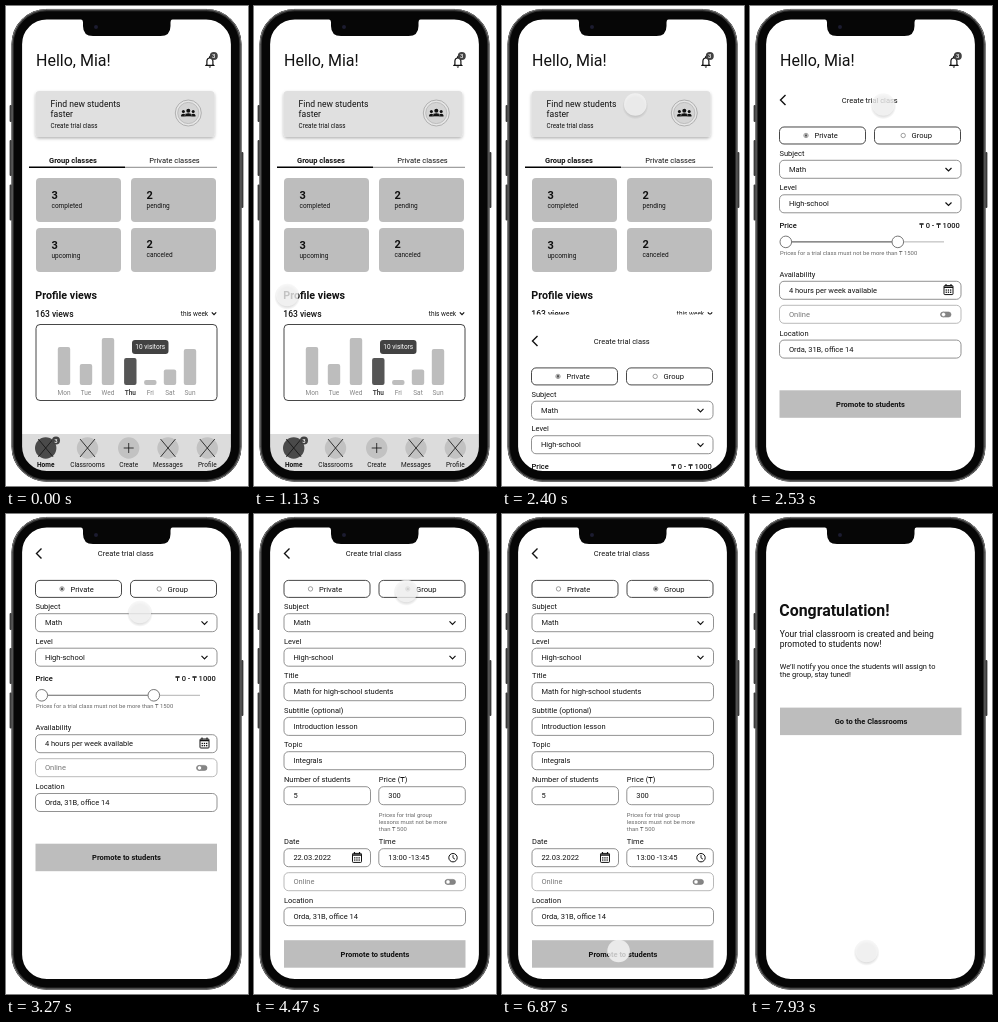
An HTML page for the animation above (8 s loop, 242x480 px).

```html
<!DOCTYPE html>
<html lang="en">
<head>
<meta charset="utf-8">
<title>Trial class prototype</title>
<style>
  html, body { margin: 0; width: 100%; height: 100%; overflow: hidden; background: #fff; }
  svg { display: block; width: 100vw; height: 100vh; }
  text { font-family: Roboto, "Noto Sans", "DejaVu Sans", sans-serif; white-space: pre; }
</style>
</head>
<body>
<svg id="stage" viewBox="0 0 242 480"></svg>
<script>
const LOOP = 8000;
const GRAY = '#bdbdbd', DARK = '#424242', INK = '#111';

// Drawing helpers, each returning SVG markup
const text = (x, y, str, size = 7.5, o = {}) =>
  `<text x="${x}" y="${y}" font-size="${size}" font-weight="${o.w || 400}" fill="${o.fill || INK}" text-anchor="${o.at || 'start'}">${str}</text>`;
const rect = (x, y, w, h, r, fill, stroke = 'none', sw = 0.8) =>
  `<rect x="${x}" y="${y}" width="${w}" height="${h}" rx="${r}" fill="${fill}" stroke="${stroke}" stroke-width="${sw}"/>`;
const disc = (x, y, r, fill, stroke = 'none', sw = 0.8) =>
  `<circle cx="${x}" cy="${y}" r="${r}" fill="${fill}" stroke="${stroke}" stroke-width="${sw}"/>`;
const line = (d, stroke = INK, sw = 0.8) =>
  `<path d="${d}" fill="none" stroke="${stroke}" stroke-width="${sw}"/>`;
const group = (id, body) => `<g id="${id}">${body}</g>`;

const badge = (x, y) => disc(x, y, 4, DARK) + text(x, y + 2.1, '3', 6, { fill: '#fff', at: 'middle', w: 500 });
const chevron = (x, y, s = 3) => line(`M${x - s} ${y - s / 2}l${s} ${s}l${s} ${-s}`, INK, 1.2);

function people(x, y) {
  const side = dx => disc(x + dx, y - 1.4, 1.5, INK) +
    `<path d="M${x + dx - 2.3} ${y + 3.6}v-1.2q0-1.7 2.3-1.7t2.3 1.7v1.2z" fill="${INK}"/>`;
  return side(-4.9) + side(4.9) + disc(x, y - 2.2, 2, INK) +
    `<path d="M${x - 3.4} ${y + 3.6}v-1.3q0-2.2 3.4-2.2t3.4 2.2v1.3z" fill="${INK}" stroke="#d4d4d4" stroke-width=".4"/>`;
}

function calendar(x, y) {
  let s = rect(x - 4.5, y - 4, 9, 9, 0.8, 'none', INK, 1) + line(`M${x - 4.5} ${y - 2.4}h9`, INK, 1.5) +
    line(`M${x - 2.5} ${y - 5.5}v2M${x + 2.5} ${y - 5.5}v2`, INK, 1.1);
  for (let i = 0; i < 6; i++) s += rect(x - 2.9 + (i % 3) * 2.2, y - 0.2 + (i > 2) * 2.2, 1.3, 1.3, 0, INK);
  return s;
}

const clock = (x, y) => disc(x, y, 4.2, 'none', INK, 1) + line(`M${x} ${y - 2.6}v2.8l2 1.3`, INK, 0.9);

function tile(x, y, n, label, dy) {
  return rect(x, y, 85, 44, 4, GRAY) + text(x + 15.5, y + 21 - dy, n, 11, { w: 700 }) +
    text(x + 15.5, y + 30 - dy, label, 6.5);
}

function chart() {
  const days = ['Mon', 'Tue', 'Wed', 'Thu', 'Fri', 'Sat', 'Sun'];
  const mid = [58, 80, 102, 124.3, 144.3, 164, 184], top = [341, 358, 332, 352, 374, 363.5, 343];
  return rect(30, 318.5, 181, 76, 4, '#fff', '#333', 0.9) + days.map((d, i) => {
    const on = d === 'Thu';
    return rect(mid[i] - 6.2, top[i], 12.4, 379 - top[i], 2, on ? '#555' : GRAY) +
      text(mid[i], 389, d, 6.5, { at: 'middle', w: on ? 700 : 400, fill: on ? '#444' : '#858585' });
  }).join('') + rect(126, 334, 36.5, 14, 3, DARK) + text(144.2, 343.4, '10 visitors', 6.5, { at: 'middle', fill: '#fff' });
}

function tabBar() {
  const names = ['Home', 'Classrooms', 'Create', 'Messages', 'Profile'], mid = [39.7, 81.5, 122.7, 162, 201.3];
  return rect(10, 428, 222, 45, 0, '#dcdcdc') + names.map((n, i) => {
    const x = mid[i], home = i === 0;
    const mark = n === 'Create' ? `M${x - 5} 442h10M${x} 437v10` : `M${x - 7.5} 433l15 18m0-18l-15 18`;
    return disc(x, 442, 10.7, home ? '#4a4a4a' : '#c2c2c2') + line(mark, INK, 0.8) +
      text(x, 461, n, 6.5, { at: 'middle', w: home ? 700 : 400 });
  }).join('') + badge(50, 434.5);
}

function homePage() {
  const bell = 'M12 22c1.1 0 2-.9 2-2h-4c0 1.1.9 2 2 2zm6-6v-5c0-3.07-1.63-5.64-4.5-6.32V4c0-.83-.67-1.5-1.5-1.5s-1.5.67-1.5 1.5v.68C7.64 5.36 6 7.92 6 11v5l-2 2v1h16v-1l-2-2zm-2 1H8v-6c0-2.48 1.51-4.5 4-4.5s4 2.02 4 4.5v6z';
  return text(30, 60.3, 'Hello, Mia!', 16) +
    `<path d="${bell}" transform="translate(196.7 48.6) scale(.6)" fill="${INK}"/>` + badge(207.8, 50) +
    `<g filter="url(#soft)">${rect(29.5, 85, 179, 46, 4, '#e0e0e0')}</g>` +
    text(44.6, 101, 'Find new students', 8.6) + text(44.6, 111, 'faster', 8.6) +
    text(44.6, 122, 'Create trial class', 6.3) +
    disc(182.3, 107, 13, '#e6e6e6', '#aaa', 0.9) + disc(182.3, 107, 10.6, '#d4d4d4', '#b4b4b4', 0.8) + people(182.3, 107) +
    text(67, 157, 'Group classes', 7.5, { at: 'middle', w: 700 }) +
    text(168.5, 157, 'Private classes', 7.5, { at: 'middle' }) +
    line('M119 161.3H211', '#555', 0.7) + line('M23 161.3H119', '#000', 1.5) +
    tile(30, 172, '3', 'completed', 0) + tile(125, 172, '2', 'pending', 0) +
    tile(30, 222, '3', 'upcoming', 0) + tile(125, 222, '2', 'canceled', 0.6) +
    text(29.3, 293, 'Profile views', 10.7, { w: 600 }) + text(29.3, 310.5, '163 views', 8.5, { w: 500 }) +
    text(174.8, 310, 'this week', 6.5) + chevron(208, 307.5, 2.2) + chart() + tabBar();
}

// Form parts; x is the left margin
const field = (x, y, str, w = 181.5, muted = false) =>
  rect(x, y - 0.3, w, 18, 4.5, '#fff', muted ? '#a8a8a8' : '#777', 0.8) +
  text(x + 9.4, y + 11.3, str, 7.5, { fill: muted ? '#777' : INK });
const labelled = (x, y, label, str, w) => text(x, y - 4.8, label) + field(x, y, str, w);
const online = (x, y) => field(x, y, 'Online', 181.5, true) +
  rect(x + 161, y + 6.4, 10.5, 5, 2.5, '#858585', '#777', 0.6) + disc(x + 164, y + 8.9, 2.2, '#fff', '#777', 0.7);
const button = (x, y, str) => rect(x, y, 181.5, 27.5, 0, GRAY) +
  text(x + 91, y + 16.4, str, 7.5, { at: 'middle', w: 700 });

function radio(x, y, dot, label, on) {
  return rect(x, y, 86, 17, 4.5, '#fff', '#333', 0.9) + disc(x + dot, y + 8.5, 2.2, '#fff', '#777', 0.7) +
    (on ? disc(x + dot, y + 8.5, 1.3, '#555') : '') + text(x + dot + 8.4, y + 11.3, label, 7.6);
}

function formHead(x, isGroup) {
  return rect(0, 13, 242, 470, 0, '#fff') + line('M35.5 34.5l-5 5l5 5', INK, 1.4) +
    text(119.8, 42.2, 'Create trial class', 7.5, { at: 'middle' }) +
    radio(x, 66.4, 26.5, 'Private', !isGroup) + radio(x + 95, 66.4, 28.7, 'Group', isGroup) +
    labelled(x, 100, 'Subject', 'Math') + chevron(198.5, 108.9) +
    labelled(x, 134.5, 'Level', 'High-school') + chevron(198.5, 143.4);
}

const PLACE = 'Orda, 31B, office 14';

function privateForm() {
  const x = 29.5, knob = cx => disc(cx, 181.3, 5.8, '#fff', '#777', 1);
  return formHead(x, false) + text(x, 167.4, 'Price', 7.5, { w: 500 }) +
    text(209.7, 167.2, '₸ 0 - ₸ 1000', 7.5, { at: 'end', w: 500 }) +
    line('M148 181.3H194', '#aaa', 0.9) + line('M36 181.3H148', '#666', 1.1) + knob(35.8) + knob(147.8) +
    text(x + 0.5, 194, 'Prices for a trial class must not be more than ₸ 1500', 5.9, { fill: '#666' }) +
    labelled(x, 221, 'Availability', '4 hours per week available') + calendar(198.5, 229) +
    online(x, 245) + labelled(x, 279.8, 'Location', PLACE) + button(x, 329.7, 'Promote to students');
}

function groupForm() {
  const x = 30, x2 = 124.8, half = 86.5;
  const note = ['Prices for trial group', 'lessons must not be more', 'than ₸ 500'];
  return formHead(x, true) +
    labelled(x, 169, 'Title', 'Math for high-school students') +
    labelled(x, 203.7, 'Subtitle (optional)', 'Introduction lesson') +
    labelled(x, 238, 'Topic', 'Integrals') +
    labelled(x, 273, 'Number of students', '5', half) + labelled(x2, 273, 'Price (₸)', '300', half) +
    note.map((s, i) => text(x2, 303 + i * 7, s, 5.9, { fill: '#666' })).join('') +
    labelled(x, 335, 'Date', '22.03.2022', half) + calendar(103, 343.4) +
    labelled(x2, 335, 'Time', '13:00 -13:45', half) + clock(199, 343.7) +
    online(x, 359) + labelled(x, 394, 'Location', PLACE) + button(x, 426.2, 'Promote to students');
}

function donePage() {
  return text(29.3, 102, 'Congratulation!', 15.9, { w: 700 }) +
    text(29.8, 123, 'Your trial classroom is created and being', 8.5) +
    text(29.8, 133, 'promoted to students now!', 8.5) +
    text(29.8, 155, 'We’ll notify you once the students will assign to', 7.45) +
    text(29.8, 163, 'the group, stay tuned!', 7.45) + button(30, 193.6, 'Go to the Classrooms');
}

function phone() {
  const key = (x, y, h) => rect(x, y, 2.4, h, 1, '#3a3a3a');
  return key(3.6, 99, 17) + key(3.6, 134, 36) + key(3.6, 178.5, 36) + key(235, 146, 56) +
    rect(10.8, 8.2, 219.4, 462.2, 30, 'none', '#060606', 10.6) +
    rect(7, 4.4, 227, 469.8, 33.8, 'none', '#333', 1.6) +
    rect(6, 3.4, 229, 471.8, 34.8, 'none', '#7c7c7c', 1) +
    `<path d="M72 12.5h97q-4.5 0-4.5 4v3.5q0 10-10 10H87q-10 0-10-10v-3.5q0-4-5-4z" fill="#060606"/>` +
    disc(90, 21, 2, '#1c1c30');
}

const stage = document.getElementById('stage');
stage.innerHTML = `<defs>
    <clipPath id="screen"><rect x="15" y="12" width="211" height="454" rx="25"/></clipPath>
    <filter id="soft" x="-10%" y="-20%" width="120%" height="150%"><feDropShadow dx="0" dy="1.5" stdDeviation="1.8" flood-opacity=".3"/></filter>
    <radialGradient id="shade"><stop offset=".72" stop-opacity=".14"/><stop offset="1" stop-opacity="0"/></radialGradient>
  </defs>
  <rect width="242" height="480" fill="#fff"/>
  <g clip-path="url(#screen)">` +
  group('home', homePage()) + group('private', privateForm()) + group('group', groupForm()) + group('done', donePage()) +
  '</g>' + phone() +
  group('touch', disc(0, 1.8, 13, 'url(#shade)') + disc(0, 0, 11.3, '#f6f6f6'));

const el = id => document.getElementById(id);
const pages = { home: el('home'), private: el('private'), group: el('group'), done: el('done') };
const touch = el('touch'), shade = touch.firstChild;
touch.lastChild.setAttribute('fill-opacity', 0.78);

const SLIDE = 2352, TO_GROUP = 4465, TO_DONE = 7865;

// Touch moves: start, end, from, to, sideways bend of the path
const moves = [
  [490, 670, [-15, 349], [4, 332], 0],
  [890, 1740, [4, 332], [133.3, 98.5], 18],
  [3220, 3740, [133.3, 98.5], [152.3, 77], 4],
  [5035, 5885, [152.3, 77], [137, 320], -27],
  [6230, 6865, [137, 320], [116.6, 437], 0]
];
// While pressed the touch lies flat, without its shadow
const presses = [[1765, SLIDE], [6860, TO_DONE]];

const clamp = v => Math.min(1, Math.max(0, v));
const swing = v => 0.5 - 0.5 * Math.cos(Math.PI * v);

function touchAt(t) {
  const [a, b, p, q, bend] = moves.filter(m => t >= m[0]).pop() || moves[0];
  const s = swing(clamp((t - a) / (b - a)));
  return [p[0] + (q[0] - p[0]) * s + 2 * s * (1 - s) * bend, p[1] + (q[1] - p[1]) * s];
}

function render(t) {
  const show = (name, on) => pages[name].setAttribute('display', on ? 'inline' : 'none');
  const left = Math.pow(1 - clamp((t - SLIDE) / 350), 3);
  show('home', t < SLIDE + 350);
  show('private', t >= SLIDE && t < TO_GROUP);
  show('group', t >= TO_GROUP && t < TO_DONE);
  show('done', t >= TO_DONE);
  pages.private.setAttribute('transform', `translate(0 ${(left * 460).toFixed(2)})`);
  const [x, y] = touchAt(t);
  touch.setAttribute('transform', `translate(${x.toFixed(2)} ${y.toFixed(2)})`);
  shade.setAttribute('opacity', presses.some(([a, b]) => t >= a && t < b) ? 0 : 1);
}

let start = null;
function tick(now) {
  if (start === null) start = now;
  render((now - start) % LOOP);
  requestAnimationFrame(tick);
}
render(0);
requestAnimationFrame(tick);
</script>
</body>
</html>
```
